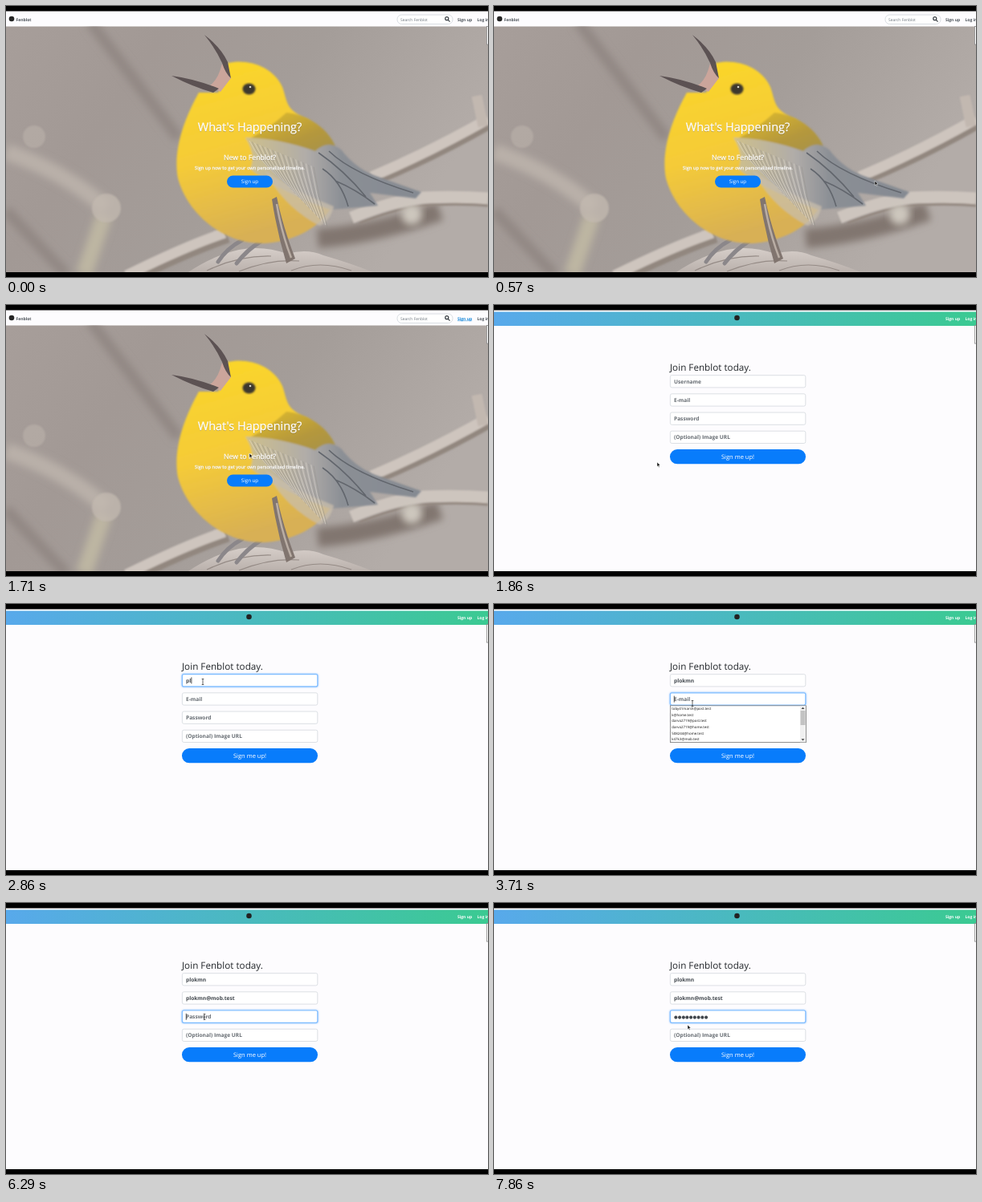
These frames come from a looping animation (600 by 338 pixels, 8000 ms). An HTML page:

```html
<!DOCTYPE html>
<html lang="en">
<head>
<meta charset="utf-8">
<title>Sign-up walkthrough</title>
<style>
html, body { margin: 0; width: 100%; height: 100%; overflow: hidden; background: #000; }
svg { display: block; width: 600px; height: 338px; }
text { font-family: "Open Sans", "Noto Sans", sans-serif; text-rendering: geometricPrecision; white-space: pre; }
.mid { text-anchor: middle; fill: #fff; }
.hero { stroke: #fff; stroke-width: .25px; }
.shadow { fill: #4a4034; opacity: .35; }
.nav { font-size: 5px; font-weight: 700; }
.field { font-size: 6.6px; font-weight: 700; }
.dots { font: 5.4px "DejaVu Sans", sans-serif; }
.list { font-size: 4.4px; fill: #111; }
</style>
</head>
<body>
<svg viewBox="0 0 600 338">
  <defs>
    <linearGradient id="haze" x2="1" y2=".35">
      <stop offset="0" stop-color="#a79e9a"/>
      <stop offset=".3" stop-color="#a29995"/>
      <stop offset=".6" stop-color="#a49d99"/>
      <stop offset="1" stop-color="#b3aca8"/>
    </linearGradient>
    <linearGradient id="belly" x2=".25" y2="1">
      <stop offset="0" stop-color="#fbd728"/>
      <stop offset=".55" stop-color="#f5cb38"/>
      <stop offset="1" stop-color="#d8b054"/>
    </linearGradient>
    <linearGradient id="back" x1=".2" x2=".9" y2="1">
      <stop offset="0" stop-color="#dcb92e"/>
      <stop offset=".5" stop-color="#b5983c"/>
      <stop offset="1" stop-color="#a08f50"/>
    </linearGradient>
    <linearGradient id="wing">
      <stop offset="0" stop-color="#cfc08c"/>
      <stop offset=".35" stop-color="#b0aca9"/>
      <stop offset=".55" stop-color="#8b8f95"/>
      <stop offset="1" stop-color="#858a92"/>
    </linearGradient>
    <linearGradient id="log" x2="0" y2="1">
      <stop offset="0" stop-color="#d6cec9"/>
      <stop offset="1" stop-color="#b8afaa"/>
    </linearGradient>
    <linearGradient id="bar">
      <stop offset="0" stop-color="#58a9eb"/>
      <stop offset="1" stop-color="#3bca92"/>
    </linearGradient>
    <filter id="soft" x="-20%" y="-20%" width="140%" height="140%"><feGaussianBlur stdDeviation="5"/></filter>
    <filter id="edge"><feGaussianBlur stdDeviation=".9"/></filter>
    <clipPath id="photo"><path d="M0 25.500H600V332H0Z"/></clipPath>
  </defs>
  <path fill="#fdfcfe" d="M0 6.500H600V332H0Z"/>

  <g id="home">
    <g clip-path="url(#photo)">
      <path fill="url(#haze)" d="M0 25H600V333H0Z"/>
      <g fill="none" filter="url(#soft)">
        <path stroke="#928884" stroke-width="14" d="M105 20L215 165M0 255L75 335"/>
        <path stroke="#b9b0a9" stroke-width="20" d="M0 182Q70 205 125 252"/>
        <path stroke="#bdb6a2" stroke-width="20" d="M122 262L97 335"/>
        <path stroke="#81766f" stroke-width="24" d="M388 290Q460 284 540 256"/>
      </g>
      <g fill="#c3bab1" filter="url(#edge)">
        <circle cx="125" cy="252" r="18" opacity=".75"/>
        <circle cx="35" cy="163" r="14" opacity=".45"/>
      </g>
      <g fill="none" stroke-linejoin="round" filter="url(#edge)">
        <path stroke="#92877f" stroke-width="15" d="M160 338Q224 306 276 288M455 218Q530 187 600 147"/>
        <path stroke="#cec5be" stroke-width="13" d="M150 336Q220 301 272 283M455 213Q530 181 600 141"/>
        <path stroke="#c2b8b0" stroke-width="13" d="M586 112L594 150"/>
        <path stroke="#cdc5be" stroke-width="15" d="M430 264Q480 243 520 239Q560 237 600 240"/>
        <path stroke="#93877f" stroke-width="3" d="M440 271Q490 250 530 248Q570 246 600 249"/>
      </g>
      <circle cx="505" cy="260" r="13" fill="#cdc7be" filter="url(#soft)"/>
      <path fill="url(#log)" d="M224 334Q255 312 290 304Q320 298 350 309Q375 302 395 311Q430 321 462 334Z"/>
      <path fill="none" stroke="#958b86" stroke-width="1.200" d="M250 330Q290 311 330 312M290 331Q330 315 365 318M355 330Q390 316 430 330"/>
      <path fill="none" stroke="#8b878a" stroke-width="5" stroke-linecap="round" d="M294 292Q275 302 264 319M318 293Q300 304 287 321"/>
      <g filter="url(#edge)">
        <path fill="url(#belly)" d="M276 71C302 65 333 76 344 101C351 121 348 130 375 140C405 158 424 195 412 235C402 270 366 293 322 296C272 298 226 260 214 215C207 178 224 137 240 108L264 108Q276 92 276 71Z"/>
        <path fill="url(#back)" d="M349 133C382 136 408 160 413 184L394 198L365 181L302 166Q326 154 349 133Z"/>
        <path fill="url(#wing)" d="M298 164Q340 165 385 181Q401 166 417 179Q437 205 466 214L517 232L510 240L453 233L463 249L405 254C379 247 326 222 304 203Q312 186 298 164Z"/>
        <path fill="#c9beab" opacity=".75" d="M322 205Q360 232 408 250Q404 268 390 274Q345 250 322 205Z"/>
      </g>
      <g id="feathers" fill="none" stroke-width=".9"></g>
      <path fill="none" stroke="#62666d" stroke-width="1.600" d="M389 183Q421 205 448 238M402 181Q432 210 507 233M394 203Q417 218 426 250M410 218Q436 229 459 247"/>
      <path fill="#cba59b" d="M269 72L280 90L267 107L254 99Q264 92 269 72Z"/>
      <path fill="#5c5253" d="M247 36Q268 52 276 70L280 90Q273 84 269 71Q261 53 247 36ZM206 87Q236 91 265 103L258 108Q233 101 206 87Z"/>
      <ellipse cx="302.500" cy="103.500" rx="8" ry="7" fill="#3c372f" filter="url(#edge)"/>
      <circle cx="304" cy="101" r="1.300" fill="#d8d5cb"/>
      <path fill="#81756f" d="M331 241L337 238Q344 273 360 315L349 321Q337 281 331 241Z"/>
      <path fill="none" stroke="#b9ada4" stroke-width="2.500" d="M337 247Q343 283 355 314"/>
    </g>
    <circle cx="7" cy="16" r="3.300" fill="#252525"/>
    <text class="nav" x="12.500" y="18.500" fill="#495057">Fenblot</text>
    <rect x="487" y="11" width="69" height="11.500" rx="5.500" fill="#fff" stroke="#cfd4da" stroke-width=".8"/>
    <text x="491" y="18.700" font-size="4.900" fill="#6c757d">Search Fenblot</text>
    <path fill="none" stroke="#343a40" stroke-width="1.200" d="M550.200 17.200L552.500 19.600M550.800 15.700a2 2 0 1 1-4 0a2 2 0 1 1 4 0"/>
    <g id="hero"></g>
    <rect x="275" y="211.500" width="57" height="15" rx="7.500" fill="#087cfb"/>
    <text class="mid" x="303.500" y="221.300" font-size="6.200">Sign up</text>
  </g>

  <g id="join">
    <path fill="url(#bar)" d="M0 8.500H600V26H0Z"/>
    <circle cx="302.500" cy="16" r="3.300" fill="#222"/>
    <text x="219" y="82.300" font-size="11.700" fill="#212529">Join Fenblot today.</text>
    <g id="fields"></g>
    <rect x="219" y="180" width="169" height="18.300" rx="9.100" fill="#087cfb"/>
    <text class="mid" x="303.500" y="191.900" font-size="7.500">Sign me up!</text>
    <path id="caret" fill="none" stroke="#222" stroke-width=".8"/>
    <g id="menu">
      <rect x="219.400" y="126.800" width="169" height="45.800" fill="#fff" stroke="#777" stroke-width=".8"/>
      <rect x="381" y="127.200" width="7" height="45" fill="#f0f0f0"/>
      <rect x="381.500" y="133" width="6" height="18" fill="#c3c3c3"/>
      <path fill="#444" d="M382.500 131L384.500 128.800L386.500 131ZM382.500 168.300L384.500 170.500L386.500 168.300Z"/>
    </g>
  </g>

  <text class="nav" id="signup" x="562" y="18.600">Sign up</text>
  <text class="nav" id="login" x="586.500" y="18.600">Log in</text>
  <rect x="598.400" y="25.500" width="4" height="22.500" fill="#fff" stroke="#8a8a8a" stroke-width=".8"/>
  <path id="arrow" fill="#111" stroke="#fff" stroke-width=".5" d="M0 0V5.600L1.300 4.500L2.200 6.500L3.100 6.100L2.200 4.100H4Z"/>
  <path id="beam" fill="none" stroke="#222" stroke-width=".7" d="M-1.300 -3.500H1.300M0 -3.500V3.500M-1.300 3.500H1.300"/>
</svg>
<script>
const LOOP = 8000, FRAME = 1000 / 7, LOADED = 1860, BLINK = 530;
const $ = id => document.getElementById(id);

function add(parent, tag, attrs, text = '') {
  const el = document.createElementNS('http://www.w3.org/2000/svg', tag);
  for (const k in attrs) el.setAttribute(k, attrs[k]);
  el.textContent = text;
  return parent.appendChild(el);
}

function heroLine(y, size, text) {
  const line = { x: 303.5, y, 'font-size': size };
  add($('hero'), 'text', { ...line, y: y + .8, class: 'mid shadow' }, text);
  add($('hero'), 'text', { ...line, class: 'mid hero' }, text);
}
heroLine(155.8, 14.5, "What's Happening?");
heroLine(192, 8.7, 'New to Fenblot?');
heroLine(203.5, 5.75, 'Sign up now to get your own personalized timeline.');

// loose flank feathers, alternately light and dark
for (let i = 0; i < 26; i++) {
  const x = 303 + i * 3.2, y = 168 + i * 1.3;
  add($('feathers'), 'path', {
    d: `M${x} ${y}q${12 - i / 4} ${26 + i / 2} ${42 - i} ${50 + i}`,
    stroke: i % 2 ? '#97938f' : '#dcd7ce', opacity: .65
  });
}

['toby41marsh@post.test', 'k@home.test', 'darvo2719@post.test', 'darvo2719@home.test',
  '508244@home.test', 'k47k3@mob.test'].forEach((mail, i) =>
  add($('menu'), 'text', { class: 'list', x: 221.3, y: 132 + i * 7.65 }, mail));

// typed: [time, number of characters]
const fields = [
  { hint: 'Username', value: 'plokmn', from: 2430, to: 3710,
    typed: [[2710, 1], [2860, 2], [3000, 3], [3140, 4], [3290, 5], [3430, 6]] },
  { hint: 'E-mail', value: 'plokmn@mob.test', from: 3710, to: 6290,
    typed: [[4290, 2], [4570, 6], [5000, 7], [5140, 8], [5290, 9], [5430, 10], [5570, 11], [5710, 13], [5860, 15]] },
  { hint: 'Password', value: '●'.repeat(9), dots: true, from: 6290, to: LOOP,
    typed: [[6430, 1], [6570, 2], [6860, 3], [7000, 5], [7140, 7], [7290, 9]] },
  { hint: '(Optional) Image URL', value: '', from: LOOP, to: LOOP, typed: [] }
];
fields.forEach((f, i) => {
  f.y = 87.6 + i * 23.2;
  f.box = add($('fields'), 'rect', { x: 219.4, y: f.y, width: 168.4, height: 15.3, rx: 2, fill: '#fff' });
  f.label = add($('fields'), 'text', { x: 224, y: f.y + 10.2 });
});

// time, x, y
const path = [[0, 440, 345], [570, 474, 218], [1140, 571, 17], [1430, 570, 18], [1710, 303, 185],
  [1860, 203, 196], [2000, 205, 190], [2290, 245, 97], [3430, 245, 97], [3710, 247, 124],
  [5710, 247, 124], [6000, 252, 130], [6290, 247, 142], [7290, 247, 142], [7860, 241, 152], [LOOP, 241, 152]];

function pointer(t) {
  const i = path.findIndex(p => p[0] > t);
  const [a, b] = [path[i - 1], path[i]];
  const k = (t - a[0]) / (b[0] - a[0]);
  return [a[1] + (b[1] - a[1]) * k, a[2] + (b[2] - a[2]) * k];
}

const show = (el, on) => el.style.display = on ? '' : 'none';

function drawField(f, t) {
  const last = f.typed.filter(s => s[0] <= t).pop() || [f.from, 0];
  const focus = t >= f.from && t < f.to;
  f.label.textContent = last[1] ? f.value.slice(0, last[1]) : f.hint;
  f.label.setAttribute('class', last[1] && f.dots ? 'dots' : 'field');
  f.label.setAttribute('fill', last[1] ? '#41474d' : '#666c72');
  f.box.setAttribute('stroke', focus ? '#80bdff' : '#d3d8dd');
  f.box.setAttribute('stroke-width', focus ? 1.2 : .8);
  f.box.style.filter = focus ? 'drop-shadow(0 0 1px #7ab8ff)' : '';
  if (focus && (t - last[0]) % (2 * BLINK) < BLINK) {
    const x = 224.3 + (last[1] ? f.label.getComputedTextLength() + .4 : 0);
    $('caret').setAttribute('d', `M${x} ${f.y + 3.8}v8`);
  }
}

function draw(now) {
  const step = Math.floor((now % LOOP + 5) / FRAME) % 56;
  const t = Math.round(step * FRAME / 10) * 10;
  const home = t < LOADED, hover = home && t >= 1140;
  show($('home'), home);
  show($('join'), !home);
  $('signup').setAttribute('fill', !home ? '#fff' : hover ? '#1687d9' : '#495057');
  $('signup').setAttribute('text-decoration', hover ? 'underline' : 'none');
  $('login').setAttribute('fill', home ? '#495057' : '#fff');

  $('caret').setAttribute('d', '');
  if (!home) fields.forEach(f => drawField(f, t));
  show($('menu'), t >= 3710 && t < 4290);

  const [x, y] = pointer(t);
  const inField = !home && x > 219 && fields.some(f => y > f.y && y < f.y + 15.3);
  for (const id of ['arrow', 'beam']) {
    show($(id), inField === (id === 'beam'));
    $(id).setAttribute('transform', `translate(${x} ${y})`);
  }
}

const start = performance.now();
function tick() {
  draw(performance.now() - start);
  requestAnimationFrame(tick);
}
tick();
</script>
</body>
</html>
```
